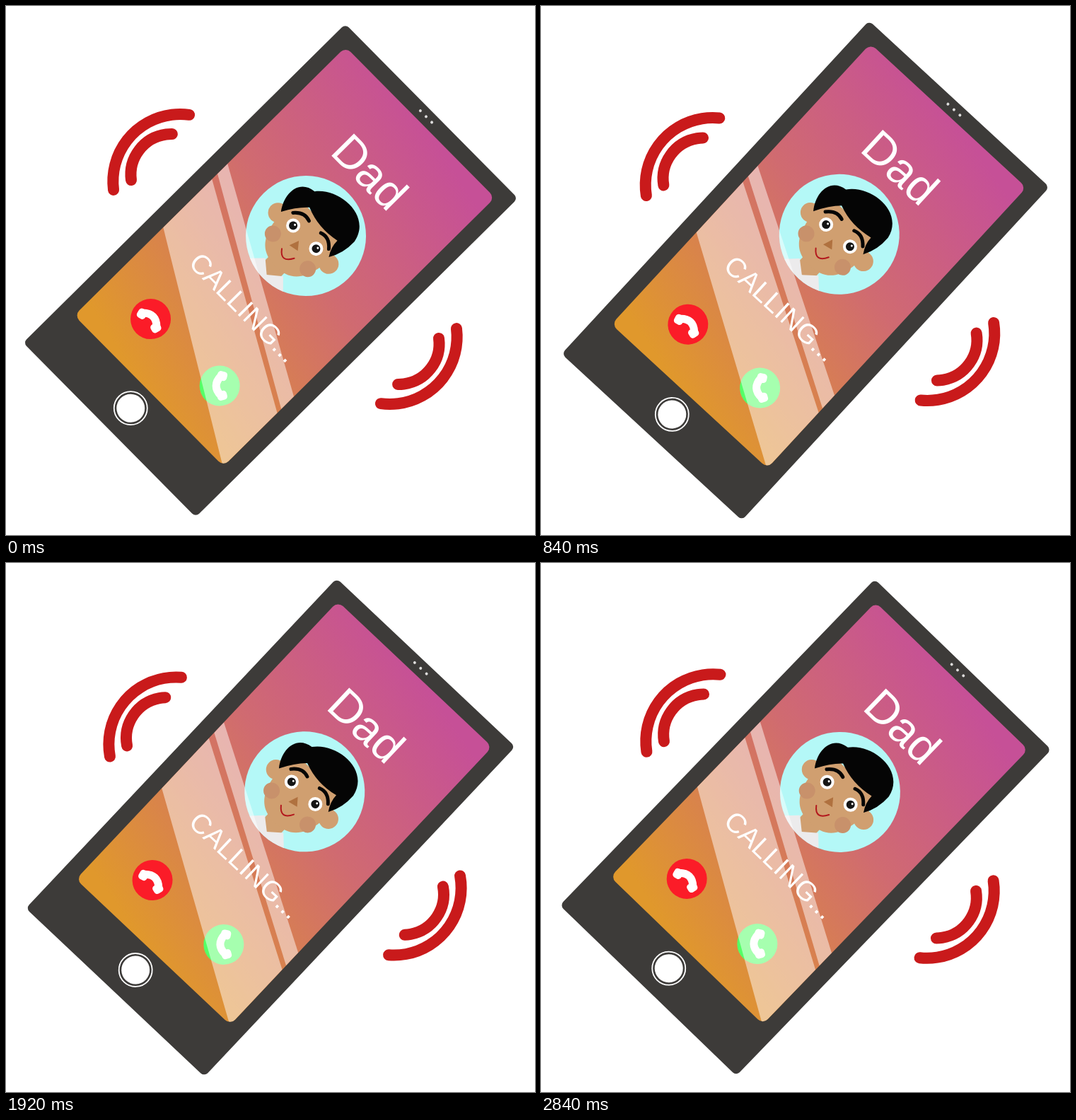
Write an HTML page with a canvas that moves like this. It is 748 by 748 pixels and loops after 2.88 s.

```html
<!DOCTYPE html>
<html lang="en">
<head>
<meta charset="utf-8">
<title>Incoming call</title>
<style>
  html, body { margin: 0; width: 100%; height: 100%; overflow: hidden; background: #fff; }
  canvas { display: block; width: 748px; height: 748px; }
</style>
</head>
<body>
<canvas id="stage"></canvas>
<script>
const SIZE = 748, LOOP = 2880, STEP = 40, TAU = Math.PI * 2;
const canvas = document.getElementById('stage');
const ctx = canvas.getContext('2d');
const ratio = window.devicePixelRatio || 1;
canvas.width = canvas.height = SIZE * ratio;

// Key poses; the shake swings once between each pair
const SWING = 2;
const poses = [
  { t: 0, phone: 45.3, waves: 0 },
  { t: 520, phone: 42.6, waves: -0.75 },
  { t: 1160, phone: 42.8, waves: -3.1 },
  { t: 1560, phone: 40.4, waves: -6.6 },
  { t: 1920, phone: 43.3, waves: -3.2 },
  { t: 2400, phone: 44.5, waves: -3.4 },
  { t: 2840, phone: 44, waves: -1.6 },
  { t: LOOP, phone: 45.3, waves: 0 }
];

function shake(part, t) {
  const i = poses.findIndex(p => p.t > t);
  const a = poses[i - 1], b = poses[i];
  const u = (t - a.t) / (b.t - a.t);
  const swing = SWING * (-1) ** i * Math.sin(TAU * u);
  return (a[part] + (b[part] - a[part]) * u + swing) * Math.PI / 180;
}

function fill(color) { ctx.fillStyle = color; ctx.fill(); }

function circle(x, y, r, color) {
  ctx.beginPath();
  ctx.arc(x, y, r, 0, TAU);
  fill(color);
}

function box(x, y, w, h, r, color) {
  ctx.beginPath();
  ctx.roundRect(x, y, w, h, r);
  fill(color);
}

function polygon(points, color) {
  ctx.beginPath();
  points.forEach(p => ctx.lineTo(...p));
  fill(color);
}

function stroke(color, width, cap = 'round') {
  ctx.strokeStyle = color;
  ctx.lineWidth = width;
  ctx.lineCap = cap;
  ctx.stroke();
}

function arc(x, y, r, from, to, color, width) {
  ctx.beginPath();
  ctx.arc(x, y, r, from * Math.PI, to * Math.PI);
  stroke(color, width);
}

function curve(x0, y0, cx, cy, x1, y1, color, width, cap) {
  ctx.beginPath();
  ctx.moveTo(x0, y0);
  ctx.quadraticCurveTo(cx, cy, x1, y1);
  stroke(color, width, cap);
}

function at(x, y, angle, draw) {
  ctx.save();
  ctx.translate(x, y);
  ctx.rotate(angle);
  draw();
  ctx.restore();
}

function label(text, x, y, size) {
  ctx.font = `${size}px "Liberation Sans", Arial, sans-serif`;
  ctx.fillStyle = '#fff';
  ctx.fillText(text, x, y);
}

function handset() {
  curve(-14, 2, 0, -12, 14, 2, '#fff', 11, 'butt');
  for (const side of [-1, 1]) {
    at(side * 14, 3, side * 0.25, () => box(-6.5, -6.5, 13, 14, 4.5, '#fff'));
  }
}

function button(x, y, color, turn) {
  circle(x, y, 28.5, color);
  at(x, y, turn, handset);
}

function avatar() {
  const skin = '#d09f70', hair = '#050505';
  circle(0, 0, 85, '#b4f8f7');
  ctx.clip();

  box(-16, 45, 32, 33, 0, skin);
  polygon([[-45, 90], [-18, 63], [0, 78], [18, 63], [45, 90]], '#ecebec');

  // Head, then mirrored features
  ctx.beginPath();
  ctx.moveTo(-47, -30);
  ctx.bezierCurveTo(-51, 36, -36, 61, 0, 61);
  ctx.bezierCurveTo(36, 61, 51, 36, 47, -30);
  fill(skin);
  for (const side of [-1, 1]) {
    circle(side * 51, 5, 14, skin);
    circle(side * 35, 31, 11.5, '#c8916b');
    circle(side * 23, 2.5, 10, '#fff');
    circle(side * 23, 2.5, 6, '#151515');
    circle(side * 23 + 1, 0, 1.5, '#fff');
    curve(side * 12, -18, side * 25, -23, side * 36, -10, hair, 5);
  }
  polygon([[-2, 12], [-7, 26], [7, 23]], '#b0713f');
  curve(-11, 37, 1, 53, 11, 34, '#b3181d', 2);

  ctx.beginPath();
  ctx.moveTo(-49, 1);
  ctx.bezierCurveTo(-65, -20, -64, -50, -36, -53);
  ctx.bezierCurveTo(-14, -82, 46, -86, 54, -43);
  ctx.quadraticCurveTo(55, -20, 44, -2);
  ctx.quadraticCurveTo(36, -14, 36, -27);
  ctx.quadraticCurveTo(4, -20, -25, -32);
  ctx.quadraticCurveTo(-38, -20, -49, 1);
  fill(hair);
}

// Light band across the screen, from its left edge to its right
function glare(left, right, leftDepth, rightDepth) {
  polygon([
    [-150, left], [150, right], [150, right + rightDepth], [-150, left + leftDepth]
  ], 'rgba(255,255,255,0.48)');
}

function phone() {
  box(-173.5, -320.5, 347, 641, 7, '#3d3b39');
  for (const i of [-1, 0, 1]) circle(i * 11.5, -309.5, 2, '#dedddc');
  circle(-0.7, 277.5, 20, '#fff');
  arc(-0.7, 277.5, 23.5, 0, 2, '#fff', 1.8);

  const sky = ctx.createLinearGradient(60, -290, -60, 235);
  sky.addColorStop(0, '#c65097');
  sky.addColorStop(0.45, '#d06b70');
  sky.addColorStop(1, '#e0982c');
  ctx.save();
  box(-150, -298, 300, 540, 10, sky);
  ctx.clip();

  at(0.4, -70, 0, avatar);
  button(-70.4, 168.7, '#fb1c28', 0);
  button(65.3, 165.7, '#54ff66', -Math.PI * 0.75);
  glare(-32, 135, 97, 108);
  glare(-63, 102, 20, 25);

  label('Dad', -60, -175.5, 65);
  label('CALLING...', -89, 77, 39);
  ctx.restore();
}

function waves() {
  for (const turn of [0, Math.PI]) {
    at(0, 0, turn, () => {
      arc(-148.2, -110, 95, 0.96, 1.543, '#c91a1b', 16);
      arc(-160.5, -119.5, 57.5, 0.958, 1.505, '#c91a1b', 16);
    });
  }
}

function frame() {
  const t = Math.floor((performance.now() % LOOP) / STEP) * STEP;
  ctx.setTransform(ratio, 0, 0, ratio, 0, 0);
  ctx.fillStyle = '#fff';
  ctx.fillRect(0, 0, SIZE, SIZE);
  at(394.5, 358, shake('waves', t), waves);
  at(374, 374, shake('phone', t), phone);
  requestAnimationFrame(frame);
}
frame();
</script>
</body>
</html>
```
